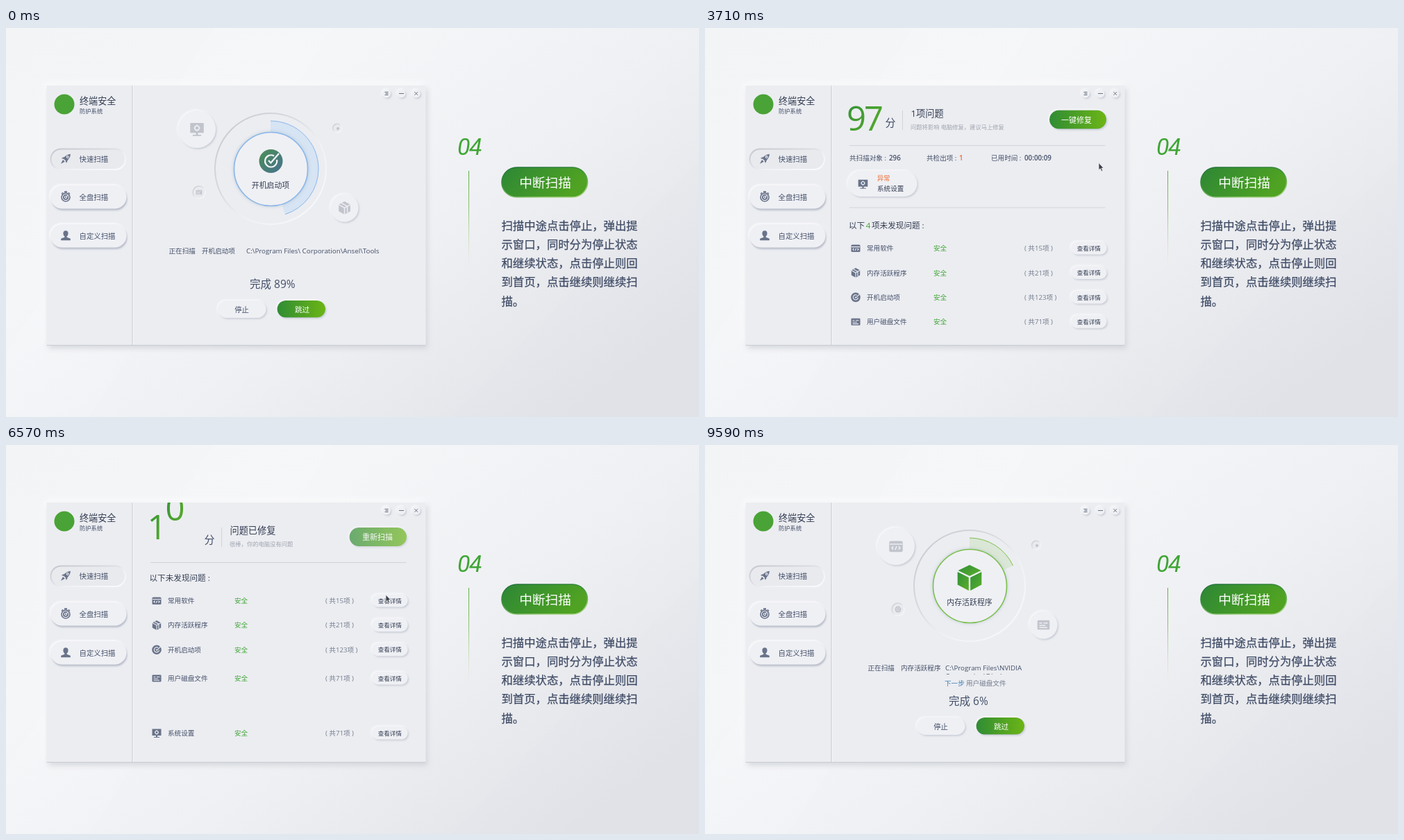
Animation of 998x561 px, one loop 9.66 s. Source, as an HTML page:

```html
<!DOCTYPE html>
<html lang="zh-CN">
<head>
<meta charset="utf-8">
<title>中断扫描</title>
<style>
html, body { margin: 0; width: 100%; height: 100%; overflow: hidden; }
svg { display: block; width: 998px; height: 561px; }
text { font-family: "Open Sans", "Noto Sans CJK SC", "Noto Sans CJK", sans-serif; fill: #434f69; white-space: pre; }
.mid { text-anchor: middle; }
.bold { font-weight: 600; }
.pale { fill: #a0a5b0; }
.soft { fill: #737c8d; }
.green { fill: #3fa535; }
.orange { fill: #ee6a2c; }
.white { fill: #fff; }
.dark { fill: #333d52; }
.copy { fill: #3f4b66; stroke: #3f4b66; stroke-width: .25; }
.chapter { font-family: Roboto, "Open Sans", sans-serif; font-style: italic; letter-spacing: -1.5px; }
.score { fill: url(#leaf); letter-spacing: -3px; }
.mark { fill: none; stroke: #edeef2; stroke-width: 1.1; }
.rule { stroke: #d0d3d9; stroke-width: 1; }
.raised { filter: url(#raise); }
.tall { filter: url(#tall); }
.glow { filter: url(#glow); }
</style>
</head>
<body>
<svg id="stage" viewBox="0 0 998 561" xmlns="http://www.w3.org/2000/svg"></svg>
<script>
const LOOP = 9660;
const FACE = '#eff0f4', INK = '#69738a', FAINT = '#c1c4cc';

// ---- drawing helpers ----
const text = (x, y, size, str, cls = '', extra = '') =>
  `<text x="${x}" y="${(y + size * 0.37).toFixed(2)}" font-size="${size}" class="${cls}" ${extra}>${str}</text>`;
const pill = (x, y, w, h, fill, extra = 'class="raised"') =>
  `<rect x="${x}" y="${y}" width="${w}" height="${h}" rx="${h / 2}" fill="${fill}" ${extra}/>`;
const circle = (x, y, r, fill, extra = '') => `<circle cx="${x}" cy="${y}" r="${r}" fill="${fill}" ${extra}/>`;
const rule = (x1, y1, x2, y2) => `<path class="rule" d="M${x1} ${y1}L${x2} ${y2}"/>`;
const group = (id, body, extra = '') => `<g id="${id}" ${extra}>${body}</g>`;
const sunk = (x, y, w, h) => pill(x, y, w, h, 'url(#badge)', 'stroke="url(#bevel)" stroke-width="1.6"');

const icons = {
  code: `<rect x="-6.5" y="-5" width="13" height="10.5" rx="1.5"/>
    <path class="mark" d="M-6-2H6M-2.5 0L-4 1.6L-2.5 3.2M2.5 0L4 1.6L2.5 3.2M.7 0L-.7 3.4"/>`,
  cube: `<path d="M0-7L6.2-3.5V3.5L0 7L-6.2 3.5V-3.5Z"/><path class="mark" d="M-6-3.4L0 0L6-3.4M0 0V7M-3-5L3-1.7V5"/>`,
  target: `<circle r="6.8"/><path class="mark" stroke-width="1.3" d="M2-3A3.6 3.6 0 1 0 3.5 .5M-1.2-.8L.2 .8L6-5"/>`,
  list: `<rect x="-6.5" y="-5" width="13" height="10" rx="1"/>
    <path class="mark" d="M-4.5-2H-1.5M0-2H4.5M-4.5 .5H2M-4.5 2.8H4"/>`,
  monitor: `<path d="M-6.5-6H6.5V3.5H-6.5ZM-1 3.5H1V5.4H4V6.5H-4V5.4H-1Z"/>
    <circle class="mark" cy="-1.2" r="2.1" stroke-width="1.4"/><path class="mark" d="M0-4.4V1.9M-3-1.2H3" stroke-dasharray="1 4.2 1"/>`,
  rocket: `<path d="M7-7C2-6.5-1.5-4-3.3-.5L.5 3.3C4 1.5 6.5-2 7-7ZM-2-3L-6-1L-3.6 .3ZM3 2L1 6L-.3 3.6ZM-4 1.2L-7 7L-1.2 4Z"/>
    <circle class="mark" cx="2.7" cy="-2.7" r="1.4"/>`,
  watch: `<circle cy=".8" r="6.8"/><path d="M-2-8H2V-6H-2ZM4.2-6.6L6.5-4.4L5.5-3.5L3.4-5.6ZM-4.2-6.6L-6.5-4.4L-5.5-3.5L-3.4-5.6Z"/>
    <circle class="mark" cy=".8" r="4.6"/><circle class="mark" cy=".8" r="1.6"/><path class="mark" d="M1 0L3-2"/>`,
  person: `<path d="M0-7C5-7 4 0 1.6 1.2V2.4L6.8 4.6V7H-6.8V4.6L-1.6 2.4V1.2C-4 0-5-7 0-7Z"/>`
};
const icon = (name, x, y, scale = 1, fill = INK) =>
  `<g transform="translate(${x} ${y}) scale(${scale})" fill="${fill}">${icons[name]}</g>`;

const sideButton = (y, h, name, label, pressed) =>
  (pressed
    ? pill(64.5, y, 107.5, h, '#e9eaee', 'stroke="url(#dent)" stroke-width="2"')
    : pill(64, y, 109.5, h, FACE, 'class="tall"')) +
  icon(name, 86, y + h / 2 - 0.5) + text(105.5, y + h / 2, 10.4, label);

const bubble = (x, y, r, name, scale) =>
  circle(x, y, r, FACE, 'class="raised"') + icon(name, x, y, scale, FAINT);

// ---- pages ----
function scanPage(id, o) {
  const ring = (r, w, color, cls) =>
    `<circle class="${cls}" cx="381" cy="203" r="${r}" fill="none" stroke="${color}" stroke-width="${w}"
      pathLength="360" stroke-dasharray="0 360" transform="rotate(-90 381 203)"/>`;
  return group(id,
    circle(381, 203, 80, 'none', 'stroke="url(#dent)" stroke-width="2"') +
    ring(61, 16, o.tint, 'arc') + ring(69, 1, o.line, 'arc') +
    circle(381.5, 203.5, 53, FACE, `stroke="${o.line}" stroke-width="1.6" class="glow"`) +
    o.center + text(381, 227, 10.9, o.name, 'mid dark') +
    bubble(275, 146, 27, o.near[0], 1.5) + bubble(487.5, 259.5, 20, o.near[1], 1.35) +
    circle(278, 237, 9, '#e9eaee', 'stroke="url(#dent)" stroke-width="1.4"') + icon(o.near[2], 278, 237, 0.65, FAINT) +
    circle(477, 144.5, 6.3, '#e9eaee', 'stroke="url(#dent)" stroke-width="1.4"') + circle(478, 145, 2, FAINT) +
    text(234.5, 321.5, 9.6, '正在扫描') + text(282, 321.5, 9.6, o.name) +
    `<g clip-path="url(#pathBox)">${text(346, 321.5, 9.8, '', 'line1')}${text(346, 333, 9.8, '', 'line2')}</g>` +
    (o.next ? text(345, 343, 9.6, '下一步', '', 'style="fill:#3f7fb5"') + text(376, 343, 9.6, o.next, 'soft') : '') +
    text(351, 369, 15.5, '', 'percent') +
    pill(305, 393, 69.5, 25, FACE) + text(339.5, 406, 10.3, '停止', 'mid') +
    pill(390.5, 393, 69.5, 24.5, 'url(#leafAcross)') + text(426.5, 406, 10.6, '跳过', 'mid white'));
}

const header = (x, title, note) =>
  text(x, 136, 15, '分', 'mid') + rule(x + 17.5, 119, x + 17.5, 147) +
  text(x + 29.5, 123, 13.2, title, 'dark') + text(x + 29, 142.5, 8.3, note, 'pale') + rule(208, 169.5, 576.5, 169.5);

const row = (y, [name, label, count]) =>
  group('', icon(name, 217, y) + text(233, y, 9.6, label) + text(329, y, 9.6, '安全', 'green') +
    text(460, y, 9.6, `( 共${count}项 )`, 'soft') +
    pill(527, y - 9.5, 51.5, 18.5, FACE) + text(552.7, y, 8.5, '查看详情', 'mid dark'), 'class="step"');

const checks = [
  ['code', '常用软件', 15], ['cube', '内存活跃程序', 21], ['target', '开机启动项', 123],
  ['list', '用户磁盘文件', 71], ['monitor', '系统设置', 71]
];
const rows = (y, n) => checks.slice(0, n).map((c, i) => row(y + 35.4 * i, c)).join('');
const stat = (x, label, valueX, value, cls = '') =>
  text(x, 187.5, 9.6, label + ' :') + text(valueX, 187.5, 9.8, value, 'bold ' + cls);

const card = group('card',
  pill(205.5, 206, 100, 37, FACE) +
  group('cardText', icon('monitor', 227.5, 225, 1.05) + text(248, 217, 9.2, '异常', 'orange') + text(248, 231, 9.6, '系统设置', 'dark')) +
  group('repair',
    pill(205.7, 206.5, 98.8, 36, '#c9dfc0', 'fill-opacity=".7" stroke="#8fbf52" stroke-width="1.5"') +
    pill(217, 222.3, 76, 4, '#fff', '') +
    '<rect id="repairBar" x="217" y="222.3" width="0" height="4" rx="2" fill="#4fa62a"/>'),
  'class="step"');

const issuePage = group('issues',
  text(204, 129.5, 49, '97', 'score') +
  header(267, '1项问题', '问题将影响 电脑修复，建议马上修复') +
  group('fixUp', pill(496, 118.5, 82, 27, 'url(#leafAcross)')) + group('fixDown', sunk(496.5, 118.5, 80, 26)) +
  text(535, 132.5, 11, '一键修复', 'mid white') +
  stat(208, '共扫描对象', 265, '296') + stat(319, '共检出项', 366, '1', 'orange') + stat(412, '已用时间', 460, '00:00:09') +
  card + rule(208, 259, 576.5, 259) +
  group('', text(207, 284.5, 11.6, '以下', 'dark') + text(231.7, 284.5, 11.6, '4', 'green') +
    text(240, 284.5, 11.6, '项未发现问题 :', 'dark'), 'class="step"') +
  rows(317.6, 4));

const donePage = group('done',
  [1, 0, 0].map((d, i) => text(203.5 + 26 * i, 129.5, 49, d, 'score digit')).join('') +
  header(293, '问题已修复', '很棒，你的电脑没有问题') +
  group('again', pill(494.5, 119, 82.5, 27, 'url(#leafAcross)') + text(535, 132.5, 11, '重新扫描', 'mid white')) +
  group('', text(206.5, 191.3, 11.6, '以下未发现问题 :', 'dark'), 'class="step"') + rows(224.5, 5));

const blueTarget = circle(381.5, 192, 17, 'url(#teal)') +
  `<path d="M386 184.5A8.6 8.6 0 1 0 390 190M378 191L381.3 194.5L393 181" fill="none" stroke="#f3f5f8" stroke-width="2.2"/>`;
const greenCube =
  `<g transform="translate(381 191.5)" fill="url(#leaf)"><path d="M0-18.5L16.5-10.5L0-2.5L-16.5-10.5Z"/>
   <path d="M-17.3-8.5L-1.2-.5V18.5L-17.3 10Z"/><path d="M17.3-8.5L1.2-.5V18.5L17.3 10Z"/></g>`;

const stops = list => list.map(([o, c, a = 1]) => `<stop offset="${o}" stop-color="${c}" stop-opacity="${a}"/>`).join('');
const gradient = (id, x2, y2, list) => `<linearGradient id="${id}" x2="${x2}" y2="${y2}">${stops(list)}</linearGradient>`;
const copy = ['扫描中途点击停止，弹出提', '示窗口，同时分为停止状态', '和继续状态，点击停止则回', '到首页，点击继续则继续扫', '描。'];

const stage = document.getElementById('stage');
stage.innerHTML = `<defs>
  ${gradient('bg', 1, 0.75, [[0, '#f3f4f6'], [0.35, '#f5f6f8'], [0.65, '#eff0f3'], [1, '#e2e3e8']])}
  ${gradient('leaf', 1, 1, [[0, '#2f9137'], [1, '#5cae2a']])}
  ${gradient('leafAcross', 1, 0, [[0, '#2f8c34'], [1, '#6cb516']])}
  ${gradient('badge', 1, 0.3, [[0, '#2d8735'], [1, '#50a322']])}
  ${gradient('bevel', 0.5, 1, [[0, '#1f6f3c'], [0.5, '#3c8f3a'], [1, '#a3d184']])}
  ${gradient('teal', 1, 1, [[0, '#4b8f55'], [1, '#47718f']])}
  ${gradient('dent', 1, 1, [[0, '#c3c6ce'], [0.4, '#d9dbe0'], [0.6, '#f0f1f4'], [1, '#fafbfc']])}
  <linearGradient id="stem" gradientUnits="userSpaceOnUse" x1="0" y1="206" x2="0" y2="345">${stops([[0, '#5fae49'], [0.4, '#8fc46f'], [1, '#c0dfac', 0]])}</linearGradient>
  <filter id="raise" x="-30%" y="-50%" width="160%" height="200%">
    <feDropShadow dx="1.4" dy="1.6" stdDeviation="1.2" flood-color="#9aa2b5" flood-opacity=".5"/>
    <feDropShadow dx="-1.3" dy="-1.3" stdDeviation="1.2" flood-color="#fff" flood-opacity=".7"/>
  </filter>
  <filter id="tall" x="-15%" y="-40%" width="130%" height="180%">
    <feDropShadow dx="1" dy="2.4" stdDeviation="1.1" flood-color="#8f98ad" flood-opacity=".65"/>
    <feDropShadow dx="-1.3" dy="-1.5" stdDeviation="1.3" flood-color="#fff" flood-opacity=".8"/>
  </filter>
  <filter id="glow" x="-20%" y="-20%" width="140%" height="140%">
    <feDropShadow dx="0" dy="0" stdDeviation="2.5" flood-color="#8fa9b8" flood-opacity=".5"/>
  </filter>
  <filter id="lift" x="-5%" y="-5%" width="110%" height="112%">
    <feDropShadow dx="2" dy="4" stdDeviation="4" flood-color="#9aa0ae" flood-opacity=".45"/>
    <feDropShadow dx="-3" dy="-3" stdDeviation="4" flood-color="#fff" flood-opacity=".8"/>
  </filter>
  <clipPath id="pane"><path d="M183 83H604.5V457.5H183Z"/></clipPath>
  <clipPath id="pathBox"><path d="M340 314H600V331H340Z"/></clipPath>
</defs>
<rect width="998" height="561" fill="url(#bg)"/>
<path d="M0 561V470L300 0H470L120 561Z" fill="#fff" opacity=".08"/>
<path d="M998 190V561H640Z" fill="#d9dbe1" opacity=".08"/>
<rect x="58.5" y="83" width="546" height="374.5" fill="#ecedf1" filter="url(#lift)"/>
<path d="M58.5 457.5H604.5" stroke="#c9ccd3"/>
<path d="M182 83V457" stroke="#cfd2d9" stroke-width="1.4"/><path d="M183.3 83V457" stroke="#f6f7f9"/>
${circle(84, 110, 14.5, '#4aa336')}
${text(106, 105, 13.1, '终端安全', 'dark')}${text(106, 119.5, 8.3, '防护系统')}
${sideButton(174.5, 29.5, 'rocket', '快速扫描', true)}
${sideButton(227, 33.5, 'watch', '全盘扫描')}
${sideButton(283, 33.5, 'person', '自定义扫描')}
${[548, 569.3, 590.7].map(x => circle(x, 94.5, 6, FACE, 'class="raised"')).join('')}
<path d="M545.5 92.5H550.5M546.5 94.5H550.5M545.5 96.5H550.5M566 94.5H573M588.4 92.2L593 96.8M593 92.2L588.4 96.8" stroke="#5b6270" stroke-width=".9" fill="none"/>
<g clip-path="url(#pane)">
  ${scanPage('scanEnd', { tint: '#d6e4f4', line: '#8ab6ea', name: '开机启动项', center: blueTarget, near: ['monitor', 'cube', 'list'] })}
  ${issuePage}${donePage}
  ${scanPage('scanStart', { tint: '#dbe7d6', line: '#7cc04c', name: '内存活跃程序', next: '用户磁盘文件', center: greenCube, near: ['code', 'list', 'target'] })}
  <path id="cursor" d="M0 0V10.2L2.3 8.2L3.9 12L5.7 11.2L4.1 7.6H7Z" fill="#3b3f49" stroke="#f4f5f8" stroke-width=".7"/>
</g>
${text(650, 170.5, 34, '04', 'chapter green')}
<path d="M666 206h1V345h-1Z" fill="url(#stem)"/>
${sunk(714, 201, 123.5, 43)}
${text(776.5, 223.5, 18.7, '中断扫描', 'mid white')}
${copy.map((s, i) => text(713.5, 284.5 + 27.3 * i, 16.35, s, 'copy')).join('')}`;

// ---- motion ----
const $ = id => document.getElementById(id);
const ramp = (t, a, b) => Math.min(1, Math.max(0, (t - a) / (b - a)));
const inOut = p => p < 0.5 ? 4 * p ** 3 : 1 - 4 * (1 - p) ** 3;
const out = p => 1 - (1 - p) ** 3;
const show = (el, o) => { el.style.opacity = o; el.style.display = o > 0 ? '' : 'none'; };
const shift = (el, x, y) => el.setAttribute('transform', `translate(${x.toFixed(2)} ${y.toFixed(2)})`);

const paths = [
  [0, String.raw`C:\Program Files\ Corporation\Ansel\Tools`, ''],
  [1390, String.raw`D:\keyshot_w64\kS6\resource location\Texture`, ''],
  [1520, String.raw`D:\keyshot_w64\kS6\resource location\Scenes`, ''],
  [2020, String.raw`D:\keyshot_w64\kS6\resource location\KeyShot`, '6'],
  [7910, String.raw`C:\Program Files\NVIDIA`, String.raw`Corporation\Display`]
];
const moves = [
  [0, 572, 101], [250, 572, 101], [1190, 567, 194.5], [3710, 567, 194.5], [4060, 549, 130], [4330, 549, 130],
  [4460, 561, 172], [4700, 547, 216], [7260, 547, 216], [7540, 547, 134], [8750, 547, 134], [9300, 606, 92], [LOOP, 606, 92]
];

function place(t) {
  const i = moves.findIndex((m, k) => k && t <= m[0]);
  const [a, x1, y1] = moves[i - 1], [b, x2, y2] = moves[i];
  const p = inOut(ramp(t, a, b));
  shift($('cursor'), x1 + (x2 - x1) * p, y1 + (y2 - y1) * p);
  show($('cursor'), t >= 210 && t < 9300 ? 1 : 0);
}

function scan(page, angle, percent, t) {
  page.querySelectorAll('.arc').forEach(a => a.setAttribute('stroke-dasharray', `${angle} ${angle < 360 ? 360 : 0}`));
  const [, first, second] = paths.filter(p => p[0] <= t).pop();
  page.querySelector('.line1').textContent = first;
  page.querySelector('.line2').textContent = second;
  page.querySelector('.percent').textContent = `完成 ${percent}%`;
}

// Lines rise one after another into their places.
const rise = (page, t, start, gap) => page.querySelectorAll('.step').forEach((el, i) =>
  shift(el, 0, 130 * (1 - inOut(ramp(t, start + gap * i, start + gap * i + 600)))));

function draw(t) {
  show($('scanEnd'), 1 - ramp(t, 2220, 2420));
  show($('issues'), ramp(t, 2290, 2500) * (1 - ramp(t, 5310, 5520)));
  show($('done'), ramp(t, 5450, 5650) * (1 - ramp(t, 7910, 8130)));
  show($('scanStart'), ramp(t, 8130, 8560));

  scan($('scanEnd'), 162 + 198 * ramp(t, 0, 1190), 89 + Math.floor(6 * ramp(t, 0, 980)), t);
  scan($('scanStart'), 65 * ramp(t, 8560, 9590), Math.floor(6 * ramp(t, 8600, 9590)), t);

  rise($('issues'), t, 2137, 117);
  rise($('done'), t, 5545, 140);

  const pressed = t >= 4060;
  show($('fixUp'), pressed ? 0 : 1);
  show($('fixDown'), pressed ? 1 : 0);

  const busy = ramp(t, 4330, 4470);
  show($('repair'), busy);
  $('cardText').style.opacity = 1 - 0.4 * busy;
  $('repairBar').setAttribute('width', 76 * ramp(t, 4440, 5280));

  document.querySelectorAll('.digit').forEach((el, i) =>
    shift(el, 0, -80 * (1 - out(ramp(t, 6290 + 150 * i, 6890 + 150 * i)))));
  show($('again'), ramp(t, 6400, 6650));
  place(t);
}

const begin = performance.now();
function tick(now) {
  draw(Math.max(0, now - begin) % LOOP);
  requestAnimationFrame(tick);
}
draw(0);
requestAnimationFrame(tick);
</script>
</body>
</html>
```
